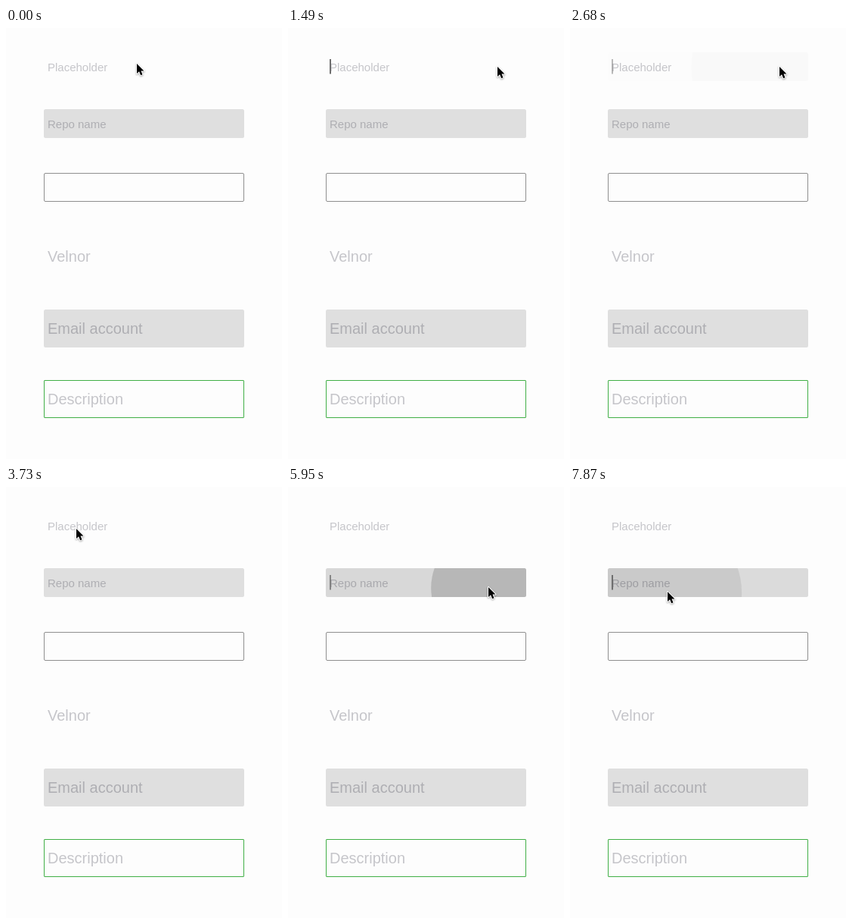
Recreate the animation shown at these times as an HTML page. Size 365 px wide and 568 px high, loop 8 s.

```html
<!DOCTYPE html>
<html lang="en">
<head>
<meta charset="utf-8">
<title>Text field ripples</title>
<style>
  html, body { margin: 0; width: 100%; height: 100%; overflow: hidden; background: #fdfdfd; }
  svg { display: block; }
  text { font: 15px "Liberation Sans", Arial, sans-serif; fill: rgb(0 0 25 / .22); }
  .large { font-size: 20px; }
  .filled { fill: #dfdfdf; }
  .outline { fill: none; stroke: #8f8f8f; }
  .green { stroke: #41af46; }
  .flash { fill: rgb(191 191 191 / .25); }
  .ripple { fill: rgb(115 115 115 / .5); }
  #caret { fill: #6e6e6e; }
  #pointer { filter: drop-shadow(0 1px 1px rgb(0 0 0 / .35)); }
  #pointer path { stroke: #fff; stroke-width: 2; stroke-linejoin: round; paint-order: stroke; }
</style>
</head>
<body>
<svg width="365" height="568" viewBox="0 0 365 568">
  <defs>
    <clipPath id="clip0"><rect x="50" y="32" width="265" height="38" rx="2.5"/></clipPath>
    <clipPath id="clip1"><rect x="50" y="107" width="265" height="38" rx="2.5"/></clipPath>
  </defs>

  <rect class="filled" x="50" y="107" width="265" height="38" rx="2.5"/>
  <rect class="outline" x="50.5" y="191.5" width="264" height="37" rx="1.5"/>
  <rect class="filled" x="50" y="371" width="265" height="50" rx="2.5"/>
  <rect class="outline green" x="50.5" y="464.5" width="264" height="49" rx=".5"/>

  <g id="effect">
    <rect class="flash" x="50" y="32" width="265" height="113"/>
    <circle class="ripple"/>
  </g>

  <text x="55" y="57">Placeholder</text>
  <text x="55" y="132">Repo name</text>
  <text class="large" x="55" y="308">Velnor</text>
  <text class="large" x="55" y="403">Email account</text>
  <text class="large" x="55" y="496">Description</text>

  <rect id="caret" x="55" width="2" height="19.5"/>
  <g id="pointer"><path d="M.5 0V13L3.6 10.3 5.7 15.2 8 14.2 6 9.4H10Z"/></g>
</svg>
<script>
  const LOOP = 8000, STEP = 148.4, RIPPLE = 750;
  const FOCUS = 140, SWITCH = 5630;
  const STALL = [3710, 4150];

  const taps = [
    { at: 60, x: 172, y: 48, field: 0 },
    { at: 1950, x: 277, y: 52, field: 0 },
    { at: 3897, x: 93, y: 56, field: 0 },
    { at: 5681, x: 265, y: 133, field: 1 },
    { at: 7355, x: 129, y: 139, field: 1 }
  ];
  const moves = [
    { from: 800, to: 1480, x: 276.5, y: 51 },
    { from: 2690, to: 3710, x: 92.5, y: 55 },
    { from: 4560, to: 5340, x: 264.5, y: 132 },
    { from: 6440, to: 7120, x: 128.5, y: 138 }
  ];

  const $ = s => document.querySelector(s);
  const effect = $("#effect"), flash = $(".flash"), circle = $(".ripple");
  const caret = $("#caret"), pointer = $("#pointer");
  const ramp = (t, a, b) => Math.min(1, Math.max(0, (t - a) / (b - a)));
  const ease = p => p < .5 ? 4 * p ** 3 : 1 - (2 - 2 * p) ** 3 / 2;

  function drawRipple(t) {
    const tap = taps.find(r => t >= r.at && t < r.at + RIPPLE);
    effect.style.display = tap ? "" : "none";
    if (!tap) return;
    const p = (t - tap.at) / RIPPLE;
    effect.setAttribute("clip-path", `url(#clip${tap.field})`);
    flash.style.opacity = 1 - p * p;
    circle.style.opacity = 1 - p;
    circle.setAttribute("cx", tap.x);
    circle.setAttribute("cy", tap.y);
    circle.setAttribute("r", 119 * (.45 + .55 * p));
  }

  function drawCaret(t) {
    const phase = t % 1000;
    const blink = 1 - ramp(phase, 640, 700) + ramp(phase, 860, 960);
    caret.setAttribute("y", t < SWITCH ? 41 : 116);
    caret.style.opacity = t < FOCUS ? 0 : t > taps[4].at ? 1 : blink;
  }

  function drawPointer(t) {
    let x = 172.5, y = 47;
    for (const m of moves) {
      const p = ease(ramp(t, m.from, m.to));
      x += (m.x - x) * p;
      y += (m.y - y) * p;
    }
    pointer.setAttribute("transform", `translate(${x} ${y})`);
  }

  function draw(now) {
    let t = Math.floor((now % LOOP) / STEP) * STEP;
    if (t > STALL[0] && t < STALL[1]) t = STALL[0];
    drawRipple(t);
    drawCaret(t);
    drawPointer(t);
  }

  let start;
  function tick(now) {
    start ??= now;
    draw(now - start);
    requestAnimationFrame(tick);
  }
  draw(0);
  requestAnimationFrame(tick);
</script>
</body>
</html>
```
